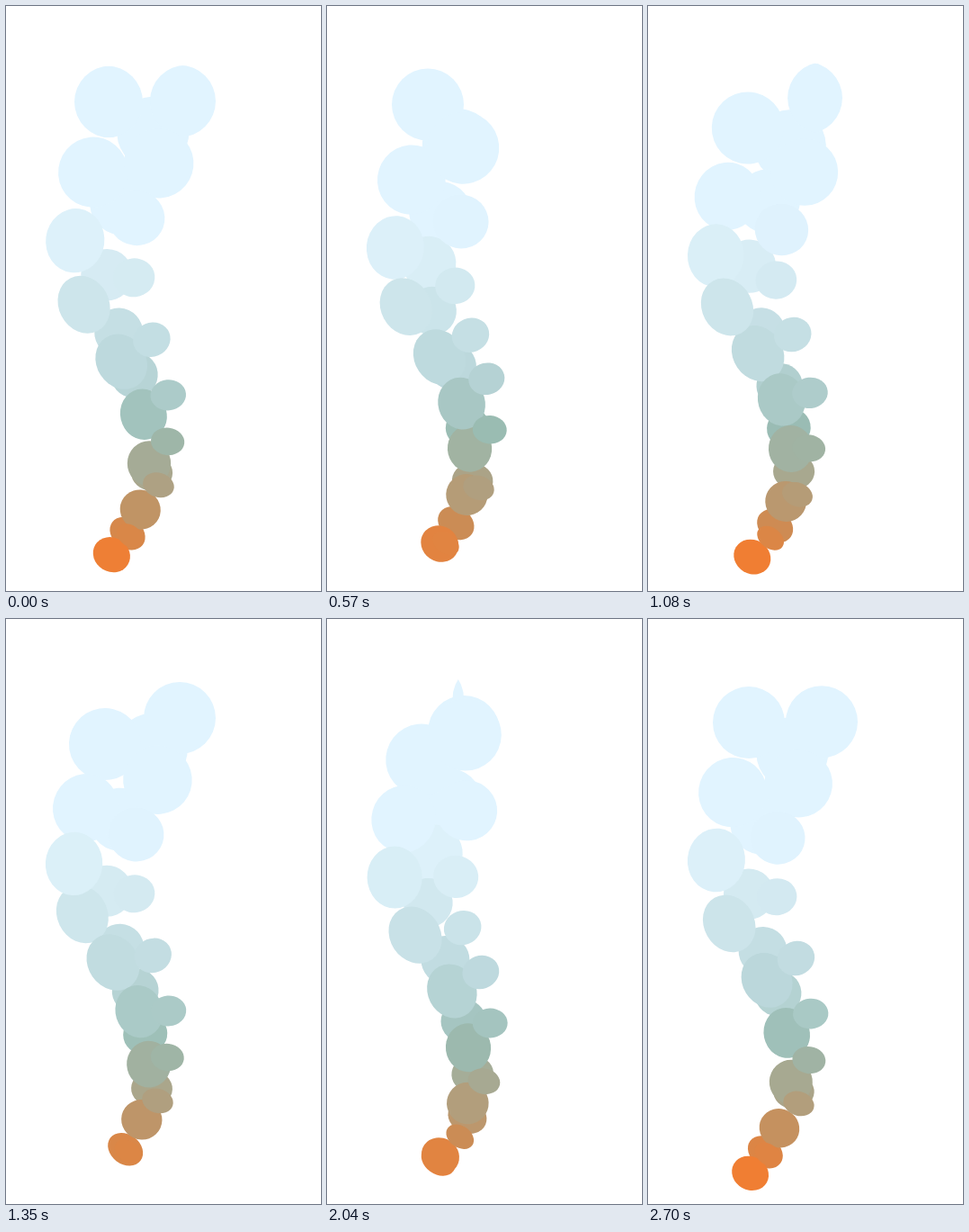
Animation, 350 px wide and 650 px high, one loop 2730 ms. Source, as an HTML page with a canvas:

```html
<!DOCTYPE html>
<html lang="en">
<head>
<meta charset="utf-8">
<title>Smoke plume</title>
<style>
  html, body { margin: 0; width: 100%; height: 100%; overflow: hidden; background: #fff; }
  canvas { display: block; }
</style>
</head>
<body>
<canvas id="stage" width="350" height="650"></canvas>
<script>
const ctx = document.getElementById('stage').getContext('2d');
const LOOP = 2730, STEP = 30, PER_LANE = 10, GAP = LOOP / PER_LANE;
const LIFE = 2250, FADE = 80, TOP_RADIUS = 40;
const KNOTS = [617, 540, 430, 300, 130]; // heights of the lane points

// Three streams of puffs, back to front. Births lean early or late in a slow wave
// (lag, waves, peak); drift sways the upper end of the stream.
const lanes = [
  { xs: [113, 160, 148, 112, 160], rx: 27, ry: 27, phase: 95, lag: 45, waves: 2, peak: 4.7, drift: 8 },
  { xs: [113, 156, 146, 76, 112], rx: 28, ry: 33, phase: -20, lag: 50, waves: 1, peak: 7, drift: 0 },
  { xs: [118, 167, 180, 142, 173], rx: 21, ry: 19, phase: 165, lag: 35, waves: 2, peak: 6, drift: 20 }
];

const COLORS = [
  [612, [240, 126, 51]], [575, [203, 140, 85]], [530, [172, 162, 133]], [470, [154, 188, 179]],
  [400, [188, 216, 220]], [285, [217, 238, 246]], [235, [225, 244, 255]]
];

const clamp = v => Math.max(0, Math.min(1, v));
const mix = (a, b, k) => a + (b - a) * k;
const wave = (turns) => Math.cos(2 * Math.PI * turns);

const puffs = lanes.flatMap(({ xs, rx, ry, phase, lag, waves, peak, drift }) =>
  Array.from({ length: PER_LANE }, (_, k) => {
    const birth = phase + k * GAP + lag * wave(waves * (k - peak) / PER_LANE);
    const sway = drift * wave(2 * (birth - 1850) / LOOP);
    return { birth, rx, ry, xs: [...xs.slice(0, -1), xs.at(-1) + sway] };
  }));

function colorAt(y) {
  const below = COLORS.findIndex(([stop]) => stop <= y);
  const i = Math.max(1, below < 0 ? COLORS.length - 1 : below);
  const [y0, c0] = COLORS[i - 1], [y1, c1] = COLORS[i];
  const k = clamp((y0 - y) / (y0 - y1));
  return `rgb(${c0.map((c, n) => Math.round(mix(c, c1[n], k)))})`;
}

// Smooth curve through the lane points.
function pathX(xs, y) {
  const last = KNOTS.length - 1;
  let i = 0;
  while (i < last - 1 && y < KNOTS[i + 1]) i++;
  const slope = j => {
    const a = Math.max(0, j - 1), b = Math.min(last, j + 1);
    return (xs[b] - xs[a]) / (KNOTS[b] - KNOTS[a]);
  };
  const h = KNOTS[i + 1] - KNOTS[i];
  const u = Math.min(1, (y - KNOTS[i]) / h), v = 1 - u;
  return v * v * (1 + 2 * u) * xs[i] + u * u * (3 - 2 * u) * xs[i + 1]
    + h * u * v * (v * slope(i) - u * slope(i + 1));
}

const heightAt = age => 617 - 0.207 * age - 0.000036 * Math.max(0, age - 1150) ** 2;

function drawPuff(puff, time) {
  const age = (time - puff.birth + LOOP) % LOOP;
  if (age >= LIFE + FADE) return;
  const y = heightAt(age), x = pathX(puff.xs, y);
  const grown = clamp((617 - y) / 240), spread = clamp((320 - y) / 155);
  const rx = mix(puff.rx * mix(0.75, 1, grown), TOP_RADIUS, spread);
  const ry = mix(puff.ry * mix(0.56, 1, grown), TOP_RADIUS, spread);
  const tilt = Math.atan2(pathX(puff.xs, y - 4) - pathX(puff.xs, y + 4), 8);
  const oval = shift => {
    ctx.beginPath();
    ctx.ellipse(x + shift, y, rx, ry, tilt, 0, 2 * Math.PI);
  };
  ctx.save();
  if (age > LIFE) {
    // A dying puff shrinks to the overlap with a copy sliding away.
    oval((age - LIFE) / FADE * 2 * rx);
    ctx.clip();
  }
  oval(0);
  ctx.fillStyle = colorAt(y);
  ctx.fill();
  ctx.restore();
}

function frame() {
  const time = Math.floor(performance.now() % LOOP / STEP) * STEP;
  ctx.clearRect(0, 0, 350, 650);
  for (const puff of puffs) drawPuff(puff, time);
  requestAnimationFrame(frame);
}
frame();
</script>
</body>
</html>
```
